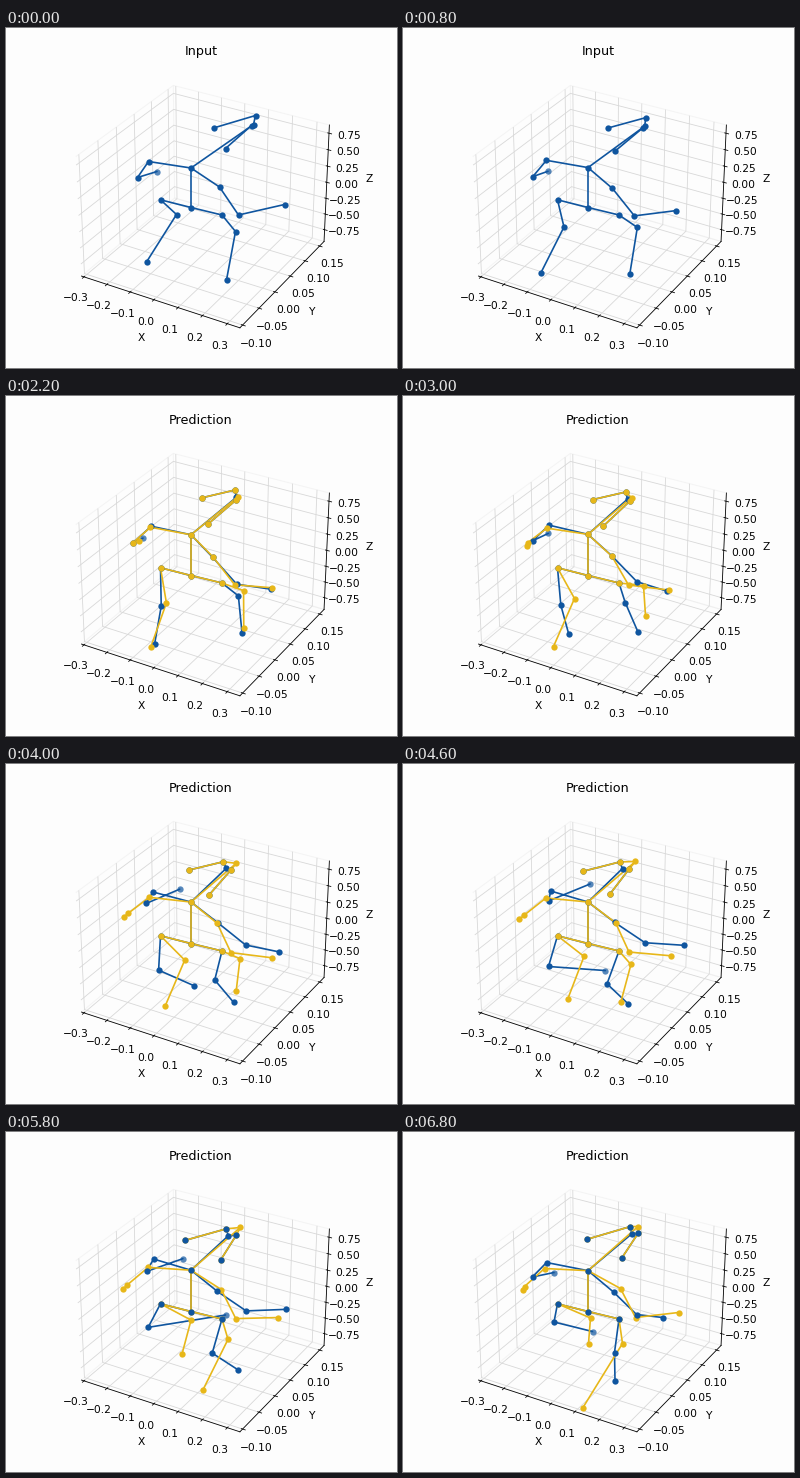
Write a matplotlib script that moves like this. It is 391 px wide and 340 px high and loops after 7 s.

```python
import numpy as np
import matplotlib.pyplot as plt
from matplotlib.animation import FuncAnimation

W, H, DPI = 391, 340, 72
FRAMES, STEP = 35, 200
FORECAST = 10        # first predicted step
BLUE, YELLOW = "#0f559f", "#e7b719"

plt.rcParams.update({
    "font.family": "DejaVu Sans",
    "font.size": 10.6,
    "grid.color": "#d8d8d8",
    "grid.linewidth": 0.83,
    "axes.linewidth": 0.83,
})


# Positions are complex numbers: x + y*1j in stage pixels, y downwards.
def glide(keys):
    """Smooth curve through a few turning points, given as {step: position}."""
    times = np.array(list(keys), float)
    pts = np.array(list(keys.values()), complex)
    slopes = np.gradient(pts, times)

    def at(t):
        i = int(np.clip(np.searchsorted(times, t, "right") - 1, 0, len(times) - 2))
        h = times[i + 1] - times[i]
        s = (t - times[i]) / h
        ease = s * s * (3 - 2 * s)
        return (pts[i] + (pts[i + 1] - pts[i]) * ease
                + h * s * (1 - s) * ((1 - s) * slopes[i] - s * slopes[i + 1]))
    return at


def lean(t):
    """Bow of the upper body: 1 at the start, 0 at the deepest point."""
    return (1 - np.cos(0.1 * (t - 23))) / (1 - np.cos(2.3))


def twist(t):
    return np.sin(2 * np.pi * t / 44)


def sway(rest, bow, turn=0):
    return lambda t: rest + bow * lean(t) + turn * twist(t)


truth = {
    "root": sway(185.5 + 180j, 0),
    "hip_a": sway(155 + 172.3j, 0),
    "knee_a": glide({0: 171 + 187j, 7: 156 + 207j, 17: 158 + 209j,
                     27: 141 + 198j, 34: 151.5 + 190.5j}),
    "foot_a": glide({0: 141 + 234.5j, 7: 139 + 250.5j, 20: 188 + 222j,
                     29: 220 + 183.5j, 34: 190 + 200j}),
    "hip_b": sway(216.5 + 187.5j, 0),
    "knee_b": glide({0: 230 + 204j, 7: 237 + 198j, 24: 204 + 221j, 34: 212 + 221j}),
    "foot_b": glide({0: 221 + 252.5j, 12: 237 + 237j, 25: 226 + 240j,
                     29: 232 + 238j, 34: 212.5 + 249j}),
    "chest": sway(185.5 + 138.5j, 2j),
    "shoulder_a": glide({0: 143 + 134j, 18: 147 + 129j, 29: 148 + 127.5j, 34: 144 + 131j}),
    "elbow_a": glide({0: 132 + 150j, 14: 129 + 146j, 25: 147 + 137j, 34: 130 + 145.5j}),
    "wrist_a": glide({0: 151.5 + 144j, 13: 139.5 + 141j, 25: 190 + 120j, 34: 151.5 + 141j}),
    "shoulder_b": glide({0: 214 + 159.5j, 8: 207 + 162j, 20: 212 + 159j, 34: 211 + 160.5j}),
    "elbow_b": glide({0: 233 + 187.5j, 10: 231 + 189j, 27: 242.5 + 178.5j, 34: 234 + 183j}),
    "wrist_b": glide({0: 279 + 177j, 15: 264 + 195.5j, 28: 283 + 177j, 34: 260 + 186j}),
    "neck": sway(220 + 105j, 28 - 8j),
    "top_a": sway(217 + 98.5j, 33 - 10.5j),
    "end_a": sway(181 + 107.5j, 27 - 7j, 5 - 2.5j),
    "top_b": sway(226 + 106j, 20 - 8j, -3 + 1.5j),
    "end_b": sway(206 + 131j, 14 - 10j, -9 + 1.5j),
}


def part_ways(name, keys):
    """Leave the actual motion just before the forecast begins."""
    start = FORECAST - 1
    return glide({start: truth[name](start), **keys})


# Joints missing here follow the actual motion.
DRIFT = {
    "knee_a": {15: 172 + 203j, 25: 183 + 191j, 34: 188 + 186.5j},
    "foot_a": {15: 151 + 251j, 25: 169 + 231j, 34: 186 + 212j},
    "knee_b": {15: 241 + 190j, 25: 225.5 + 204j, 34: 220 + 212j},
    "foot_b": {15: 243 + 220j, 25: 211 + 245j, 34: 180.5 + 276j},
    "shoulder_a": {34: 142 + 137j},
    "elbow_a": {15: 125.5 + 147j, 24: 121 + 152.5j, 34: 122 + 155j},
    "wrist_a": {15: 124 + 150j, 26: 116.5 + 157j, 34: 120 + 158.5j},
    "shoulder_b": {34: 218 + 157j},
    "elbow_b": {15: 226 + 189.5j, 34: 233 + 186j},
    "wrist_b": {17: 266 + 195j, 34: 276 + 181j},
    "neck": {15: 229 + 102j, 25: 234 + 97j, 34: 235.5 + 95j},
}
guess = {**truth, **{name: part_ways(name, keys) for name, keys in DRIFT.items()}}

CHAINS = [
    ("root", "hip_a", "knee_a", "foot_a"),
    ("root", "hip_b", "knee_b", "foot_b"),
    ("root", "chest", "neck"),
    ("chest", "shoulder_a", "elbow_a", "wrist_a"),
    ("chest", "shoulder_b", "elbow_b", "wrist_b"),
    ("neck", "top_a", "end_a"),
    ("neck", "top_b", "end_b"),
]

fig = plt.figure(figsize=(W / DPI, H / DPI), dpi=DPI, facecolor="#fdfdfd")

# Perspective box
SIDE = 282
box = fig.add_axes([54.2 / W, 22.4 / H, SIDE / W, SIDE / H], projection="3d")
box.patch.set_visible(False)
box.view_init(elev=30, azim=-60)
box.set(xlim=(-0.311, 0.35), ylim=(-0.108, 0.166), zlim=(-0.94, 0.873),
        xticks=np.arange(-3, 4) / 10,
        yticks=np.arange(-2, 4) / 20,
        zticks=np.arange(-3, 4) / 4)
for axis, name in ((box.xaxis, "X"), (box.yaxis, "Y"), (box.zaxis, "Z")):
    axis.set_label_text(name)
    axis.labelpad = 5
    axis.set_tick_params(pad=4)
    axis.pane.set_fill(False)
    axis.pane.set_edgecolor("#ebebeb")

# Skeletons are placed in stage pixels, counted from pixel centres
stage = fig.add_axes([0, 0, 1, 1], zorder=5)
stage.set(xlim=(0.5, W + 0.5), ylim=(H + 0.5, 0.5))
stage.axis("off")
title = fig.text(195 / W, 1 - 27.5 / H, "", fontsize=12.8, ha="center", va="baseline")


class Skeleton:
    def __init__(self, joints, color, order):
        self.joints = joints
        self.bones = [stage.plot([], [], color=color, lw=1.65, zorder=order,
                                 solid_capstyle="round")[0] for _ in CHAINS]
        self.dots = {name: stage.plot([], [], "o", color=color, ms=6.3, mew=0)[0]
                     for name in joints}

    def pose(self, t, order):
        spots = {name: move(t) for name, move in self.joints.items()}
        for bone, chain in zip(self.bones, CHAINS):
            line = np.array([spots[name] for name in chain])
            bone.set_data(line.real, line.imag)
        for name, dot in self.dots.items():
            dot.set_data([spots[name].real], [spots[name].imag])
            dot.set_zorder(order)

    def show(self, visible):
        for part in (*self.bones, *self.dots.values()):
            part.set_visible(visible)


blue = Skeleton(truth, BLUE, 1)
yellow = Skeleton(guess, YELLOW, 2)


def draw(t):
    predicted = t >= FORECAST
    title.set_text("Prediction" if predicted else "Input")
    blue.pose(t, 4)
    # Far joints look paler
    blue.dots["wrist_a"].set_alpha(0.7)
    blue.dots["foot_a"].set_alpha(0.7 if t >= 23 else 1)
    yellow.show(predicted)
    if predicted:
        yellow.pose(t, 5 if t < 27 else 3)
    return []


anim = FuncAnimation(fig, draw, frames=FRAMES, interval=STEP, init_func=lambda: [],
                     repeat=True, repeat_delay=0, blit=False)
plt.show()
```
